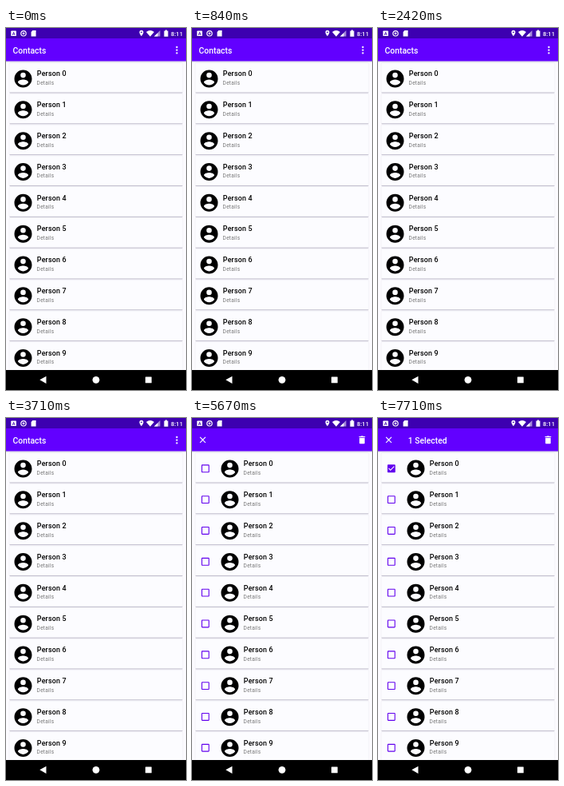
Write an HTML page that moves like this. It is 226 px wide and 453 px high and loops after 8000 ms.

```html
<!DOCTYPE html>
<html lang="en">
<head>
<meta charset="utf-8">
<title>Contacts</title>
<style>
html, body { margin: 0; width: 100%; height: 100%; overflow: hidden; background: #fcfbff; }
svg { display: block; width: 100vw; height: 100vh; }
text { font-family: Roboto, "Noto Sans", sans-serif; }
.title { font-size: 10.4px; font-weight: 500; fill: #fff; }
.name { font-size: 9px; font-weight: 500; letter-spacing: .13px; }
.details { font-size: 6.6px; letter-spacing: .22px; fill: #777; }
</style>
</head>
<body>
<svg viewBox="0 0 226 453" preserveAspectRatio="none">
  <defs>
    <path id="avatar" d="M12 2a10 10 0 1 0 0 20a10 10 0 1 0 0-20zm0 3a3 3 0 1 1 0 6a3 3 0 1 1 0-6zm0 14.2c-2.5 0-4.71-1.28-6-3.22.03-1.99 4-3.08 6-3.08 1.99 0 5.97 1.09 6 3.08-1.29 1.94-3.5 3.22-6 3.22z"/>
    <path id="box" d="M19 5v14H5V5h14m0-2H5c-1.1 0-2 .9-2 2v14c0 1.1.9 2 2 2h14c1.1 0 2-.9 2-2V5c0-1.1-.9-2-2-2z"/>
    <path id="checked" d="M19 3H5c-1.1 0-2 .9-2 2v14c0 1.1.9 2 2 2h14c1.1 0 2-.9 2-2V5c0-1.1-.9-2-2-2zm-9 14l-5-5 1.41-1.41L10 14.17l7.59-7.59L19 8l-9 9z"/>
    <path id="close" d="M19 6.41L17.59 5 12 10.59 6.41 5 5 6.41 10.59 12 5 17.59 6.41 19 12 13.41 17.59 19 19 17.59 13.41 12z"/>
    <path id="bin" d="M6 19c0 1.1.9 2 2 2h8c1.1 0 2-.9 2-2V7H6v12zM19 4h-3.5l-1-1h-5l-1 1H5v2h14V4z"/>
    <clipPath id="reveal"><rect id="revealBox" y="10" height="40"/></clipPath>
    <clipPath id="sheet"><rect x="121" y="14" width="103.5" height="26"/></clipPath>
    <filter id="shadow" x="-10%" y="-20%" width="120%" height="160%">
      <feDropShadow dx="0" dy="1.2" stdDeviation="1.3" flood-opacity=".35"/>
    </filter>
  </defs>

  <rect width="226" height="453" fill="#fcfbff"/>
  <g id="cards"></g>
  <g id="plain"></g>
  <g id="editing"></g>
  <circle id="checkRipple" cx="16.8" cy="63.3" fill="#6200ee"/>

  <rect y="41.5" width="226" height="1" fill="#c9c5d6"/>
  <rect y="13" width="226" height="28.5" fill="#6200ff"/>
  <g id="appBar">
    <text class="title" x="8.5" y="31.6">Contacts</text>
    <g fill="#fff">
      <circle cx="214.5" cy="24" r="1.15"/>
      <circle cx="214.5" cy="27.7" r="1.15"/>
      <circle cx="214.5" cy="31.4" r="1.15"/>
    </g>
    <circle id="menuRipple" cx="214.5" cy="27.7" fill="#fff"/>
  </g>
  <g id="actionBar" fill="#fff">
    <use href="#close" transform="translate(6.9 20.8) scale(.55)"/>
    <use href="#bin" transform="translate(206.9 20.8) scale(.55)"/>
    <text id="count" class="title" x="37.7" y="31.6">1 Selected</text>
  </g>

  <rect width="226" height="13" fill="#3d00b0"/>
  <g fill="#fff">
    <rect x="6.3" y="3.5" width="6.6" height="6.6" rx=".7"/>
    <text x="9.6" y="8.8" font-size="5.5" font-weight="700" text-anchor="middle" fill="#3d00b0">A</text>
    <circle cx="22" cy="6.8" r="3.2" fill="none" stroke="#fff" stroke-width="1.2"/>
    <circle cx="22" cy="6.8" r="1.4"/>
    <path d="M33.4 3h4.2v7.4h-6V5z"/>
    <path d="M170 2.8a2.5 2.5 0 0 1 2.5 2.5c0 2-2.5 5-2.5 5s-2.5-3-2.5-5a2.5 2.5 0 0 1 2.5-2.5zm0 1.6a.9.9 0 1 0 0 1.8a.9.9 0 1 0 0-1.8z"/>
    <path d="M176 5.1q5-4.2 10 0l-5 5.6z"/>
    <path d="M193.5 3v7.6H186z" opacity=".55"/>
    <path d="M190.5 6.2v4.4H186z"/>
    <path d="M200 2.6h2v.8h1.5v7.4h-5V3.4h1.5z"/>
    <text x="207" y="9.6" font-size="7.6" font-weight="500">8:11</text>
  </g>

  <g id="popup" clip-path="url(#reveal)">
    <rect x="121" y="14" width="103.5" height="26" rx="1" fill="#fff" filter="url(#shadow)"/>
    <circle id="itemRipple" cx="160" cy="27" clip-path="url(#sheet)"/>
    <text x="129.7" y="30.7" font-size="8.7" fill="#3a3a3a">Edit Contacts</text>
  </g>

  <rect y="428" width="226" height="25" fill="#000"/>
  <g fill="#fff">
    <path d="M42.3 440.3l8.2-4.6v9.2z"/>
    <circle cx="113" cy="440.3" r="4.4"/>
    <rect x="175" y="436.5" width="7.8" height="7.8" rx=".5"/>
  </g>
</svg>
<script>
const LOOP = 8000, PITCH = 38.83, SHIFT = 26;
const $ = id => document.getElementById(id);
const set = (id, attrs) => {
  for (const k in attrs) $(id).setAttribute(k, attrs[k]);
};

const rows = draw => Array.from({ length: 10 }, (_, i) => draw(i, i * PITCH)).join("");

const contact = (i, y, dx) => `<g transform="translate(${dx} ${y})">
  <use href="#avatar" transform="translate(8.3 50.3) scale(1.1)"/>
  <text class="name" x="38.8" y="60.2">Person ${i}</text>
  <text class="details" x="38.6" y="70.9">Details</text></g>`;

const icon = (name, y, id) =>
  `<use id="${id}" href="#${name}" fill="#6200ee" transform="translate(10.2 ${56.7 + y}) scale(.55)"/>`;

$("cards").innerHTML = rows((i, y) => `<g transform="translate(0 ${y})">
  <rect x="4" y="43.5" width="218" height="37.5" rx="1.5" fill="#fcfcff" stroke="#ecebf2" stroke-width=".6"/>
  <path d="M4.5 81H221.5" stroke="#bfbccb"/></g>`);
$("plain").innerHTML = rows((i, y) => contact(i, y, 0));
$("editing").innerHTML = rows((i, y) => icon("box", y, "box" + i) + contact(i, y, SHIFT))
  + icon("checked", 0, "tick");

// Eased progress from a to b
const ramp = (t, a, b) => {
  const p = Math.min(1, Math.max(0, (t - a) / (b - a)));
  return p * p * (3 - 2 * p);
};

// Circle that grows from start, then fades away between release and end
const ripple = (id, t, start, grown, release, end, r, alpha) => set(id, {
  r: r * (.3 + .7 * ramp(t, start, grown)),
  opacity: alpha * ramp(t, start, start + 80) * (1 - ramp(t, release, end))
});

function draw(t) {
  ripple("menuRipple", t, 4230, 4400, 4420, 4650, 11, .25);
  ripple("itemRipple", t, 5030, 5130, 5290, 5480, 70, .12);
  ripple("checkRipple", t, 6980, 7130, 7180, 7420, 11, .16);

  const open = ramp(t, 4400, 4680);
  set("revealBox", { x: 226 - 110 * open, width: 110 * open, height: 12 + 28 * open });
  set("popup", { opacity: open * (1 - ramp(t, 5310, 5480)) });

  const mode = ramp(t, 5330, 5580);
  set("appBar", { opacity: 1 - mode });
  set("actionBar", { opacity: mode });
  set("plain", { opacity: 1 - mode });
  set("editing", { opacity: mode });

  const picked = ramp(t, 7080, 7220);
  set("tick", { opacity: picked });
  set("box0", { opacity: 1 - picked });
  set("count", { opacity: t >= 7120 ? 1 : 0 });
}

function tick(now) {
  draw(now % LOOP);
  requestAnimationFrame(tick);
}
draw(0);
requestAnimationFrame(tick);
</script>
</body>
</html>
```
